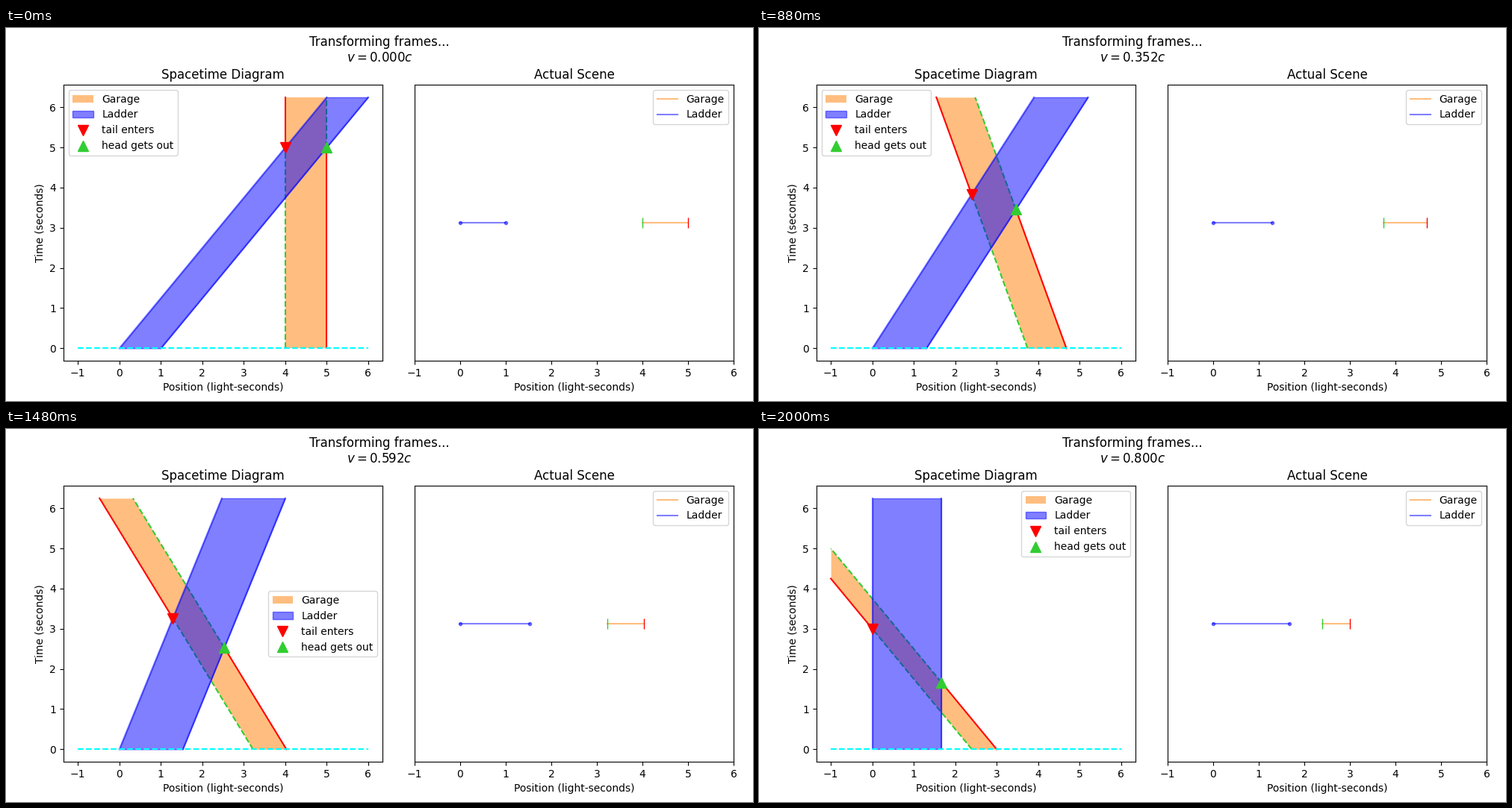
A matplotlib script that plays this animation: 1000 by 500 pixels, repeating every 2020 ms.

```python
import numpy as np
import matplotlib.pyplot as plt
from matplotlib.animation import FuncAnimation

FRAMES = 101
V_LADDER = 0.8          # ladder speed seen from the garage
DOORS = (4, 5)          # garage doors at rest
T_MAX = 6.25
X_MIN, X_MAX = -1, 6
ORANGE, GREEN = "#ff7f00", "limegreen"

plt.rcParams.update({"font.family": "DejaVu Sans", "font.size": 10})
fig = plt.figure(figsize=(10, 5), dpi=100)
heading = fig.suptitle("")


def make_axes(left, title):
    ax = fig.add_axes([left, 0.1077, 0.42745, 0.7402])
    ax.set_title(title)
    ax.set_xlabel("Position (light-seconds)")
    ax.set_xticks(range(X_MIN, X_MAX + 1))
    return ax


# spacetime diagram
ax = make_axes(0.07675, "Spacetime Diagram")
ax.set_ylabel("Time (seconds)")
ax.set_yticks(range(7))
ax.set_xlim(-1.35, 6.35)
ax.set_ylim(-0.3125, 6.5625)
ax.set_autoscale_on(False)

garage = ax.fill_betweenx([0, 1], 0, 1, color=ORANGE, alpha=0.5, lw=0,
                          zorder=1, label="Garage")
entry_open, = ax.plot([], [], "--", color=GREEN, zorder=1.1)
entry_shut, = ax.plot([], [], "-", color="red", zorder=1.1)
exit_shut, = ax.plot([], [], "-", color="red", zorder=1.1)
exit_open, = ax.plot([], [], "--", color=GREEN, zorder=1.1)
ladder = ax.fill_betweenx([0, 1], 0, 1, color="blue", alpha=0.5,
                          zorder=1.2, label="Ladder")
tail_line, = ax.plot([], [], color="blue", alpha=0.5)
head_line, = ax.plot([], [], color="blue", alpha=0.5)
ax.plot([X_MIN, X_MAX], [0, 0], "--", color="cyan")
tail_in, = ax.plot([], [], "v", color="red", ms=10, zorder=3,
                   label="tail enters")
head_out, = ax.plot([], [], "^", color=GREEN, ms=10, zorder=3,
                    label="head gets out")
ax.legend(loc="best")

# scene at time zero
scene = make_axes(0.54675, "Actual Scene")
scene.set_xlim(X_MIN, X_MAX)
scene.set_ylim(-1, 1)
scene.set_yticks([])
scene.set_autoscale_on(False)

garage_bar, = scene.plot([], [], color=ORANGE, alpha=0.5, label="Garage")
ladder_bar, = scene.plot([], [], color="blue", alpha=0.5, label="Ladder")
ladder_ends, = scene.plot([], [], ".", color="blue", alpha=0.5)
entry_mark, = scene.plot([], [], "|", color=GREEN, ms=10)
exit_mark, = scene.plot([], [], "|", color="red", ms=10)
scene.legend(loc="upper right")


def segment(line, p, q):
    line.set_data(*zip(p, q))


def update(i):
    v = V_LADDER * i / (FRAMES - 1)
    gamma = 1 / np.sqrt(1 - v * v)

    def boost(x, t):
        return gamma * (x - v * t), gamma * (t - v * x)

    # garage doors drift left at speed v, cut off at X_MIN
    near, far = (d / gamma for d in DOORS)

    def end(d):
        t = min(T_MAX, (d - X_MIN) / v) if v else T_MAX
        return d - v * t, t

    near_end, far_end = end(near), end(far)
    corner = max(X_MIN, near - v * far_end[1]), far_end[1]
    garage.set_verts([[(near, 0), near_end, corner, far_end, (far, 0)]])

    enter, leave = boost(DOORS[0], 5), boost(DOORS[1], 5)
    segment(entry_open, (near, 0), enter)
    segment(entry_shut, enter, near_end)
    segment(exit_shut, (far, 0), leave)
    segment(exit_open, leave, far_end)
    tail_in.set_data([enter[0]], [enter[1]])
    head_out.set_data([leave[0]], [leave[1]])

    # ladder: combined speed and contracted length
    u = (V_LADDER - v) / (1 - V_LADDER * v)
    size = np.sqrt((1 - u * u) / (1 - V_LADDER ** 2))
    tail_end, head_end = (u * T_MAX, T_MAX), (size + u * T_MAX, T_MAX)
    ladder.set_verts([[(0, 0), tail_end, head_end, (size, 0)]])
    segment(tail_line, (0, 0), tail_end)
    segment(head_line, (size, 0), head_end)

    garage_bar.set_data([near, far], [0, 0])
    for line in (ladder_bar, ladder_ends):
        line.set_data([0, size], [0, 0])
    entry_mark.set_data([near], [0])
    exit_mark.set_data([far], [0])
    heading.set_text(f"Transforming frames...\n$v={v:.3f}c$")


anim = FuncAnimation(fig, update, frames=FRAMES, interval=20,
                     repeat=True, repeat_delay=0, blit=False)
plt.show()
```
